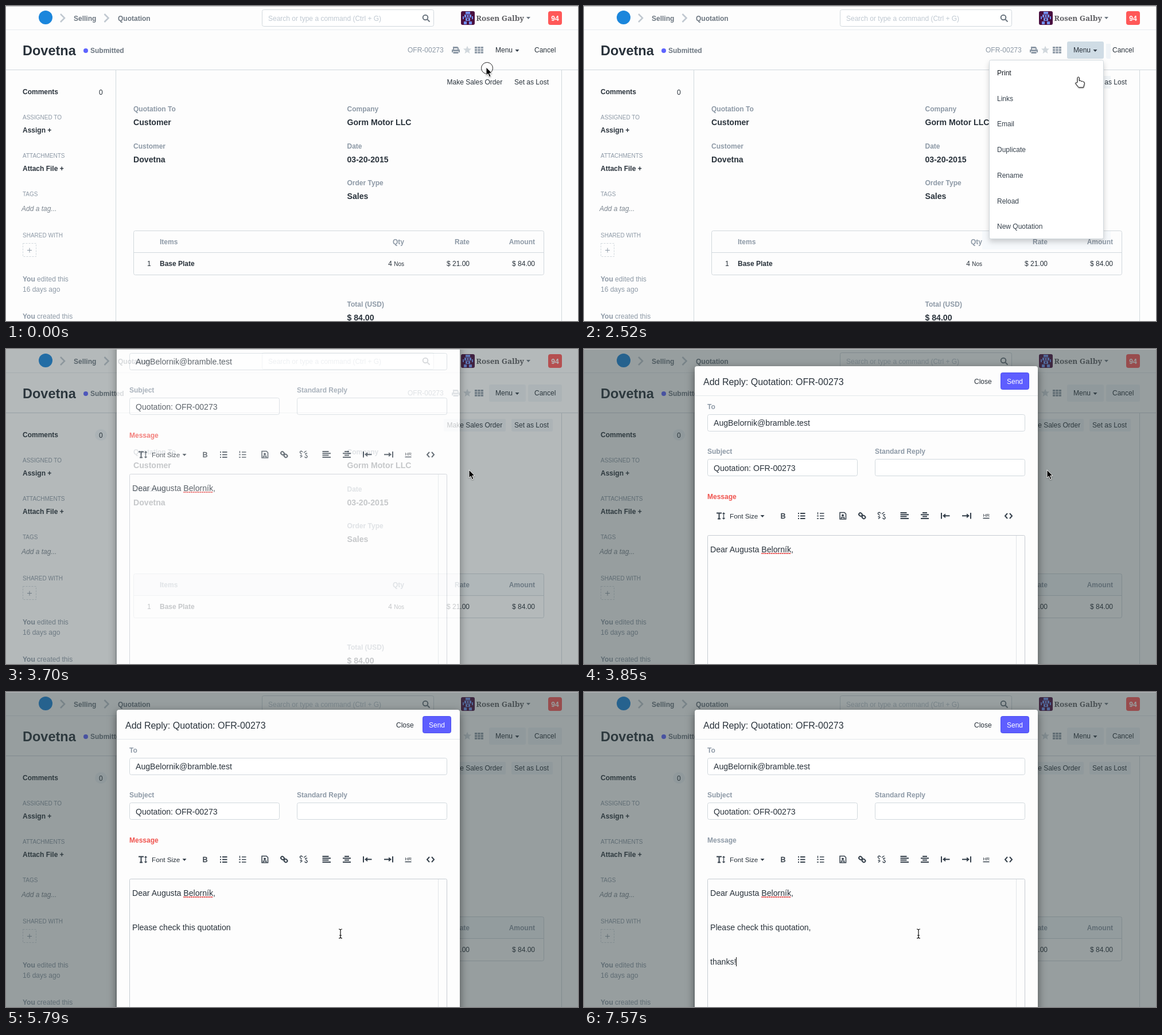
Animation, 997 px wide and 550 px high, one loop 8 s. Source, as an HTML page:

```html
<!DOCTYPE html>
<html lang="en">
<head>
<meta charset="utf-8">
<title>Quotation reply</title>
<style>
  html, body { margin: 0; width: 100%; height: 100%; overflow: hidden; background: #fdfdfd; }
  svg { display: block; width: 100%; height: 100%; }
  text { font: 12px "Liberation Sans", Arial, sans-serif; fill: #29323b; white-space: pre; }
  .b { font-weight: bold; }
  .m { fill: #8d99a6; }
  .nav { fill: #6c7680; font-weight: bold; }
  .xs { font-size: 10px; }
  .l { font-size: 14.1px; }
  .r { text-anchor: end; }
  .box { fill: #fff; stroke: #d1d8dd; }
  .line { fill: none; stroke: #d1d8dd; }
  .tint { fill: #f0f4f7; }
  .ico { fill: none; stroke: #36414c; stroke-width: 2; }
  .thin { stroke-width: 1.5; }
  .solid { fill: #36414c; stroke: none; }
  .menu { filter: drop-shadow(0 5px 5px rgba(0, 0, 0, .18)); }
  .sheet { filter: drop-shadow(0 5px 7.5px rgba(0, 0, 0, .5)); }
  .ptr { filter: drop-shadow(0 1px 1px rgba(0, 0, 0, .35)); }
</style>
</head>
<body>
<svg viewBox="0 0 997 550" preserveAspectRatio="none">
  <defs>
    <clipPath id="tintClip"><rect id="tintBox"/></clipPath>
    <path id="down" d="M0 0h7l-3.5 4z"/>
  </defs>
  <rect width="997" height="550" fill="#fdfdfd"/>

  <!-- button and header backgrounds -->
  <g clip-path="url(#tintClip)" class="tint">
    <rect x="763" y="122" width="108" height="22" rx="2"/>
    <rect x="881" y="122" width="72" height="22" rx="2"/>
    <rect x="910" y="62" width="59" height="30" rx="3"/>
    <rect x="155" y="140" width="21" height="20" rx="10"/>
    <rect x="222" y="393" width="716" height="37" fill="#f6f9fc"/>
  </g>
  <rect id="menuBtn" x="842" y="62" width="64" height="30" rx="3"/>

  <!-- top bar -->
  <path class="line" d="M0 41.5H997" style="stroke:#e8ecef"/>
  <path class="line" d="M0 111.5H997M191.5 112V550M968.5 112V550"/>
  <circle cx="69" cy="20" r="12" fill="#1b86dc"/>
  <path d="M95 14l7 7-7 7M171.5 14l7 7-7 7" fill="none" stroke="#c0c8d0" stroke-width="2.5"/>
  <text x="118" y="26" class="nav">Selling</text>
  <text x="195" y="26" class="nav">Quotation</text>
  <rect class="box" x="446.5" y="6.5" width="299" height="29" rx="3"/>
  <text x="457" y="26" style="fill:#c0c9d2">Search or type a command (Ctrl + G)</text>
  <g fill="none" stroke="#6c7680" stroke-width="2"><circle cx="731" cy="20" r="4.3"/><path d="M734.5 23.5l4 4"/></g>
  <rect x="793" y="9" width="24" height="24" rx="3" fill="#4a1040"/>
  <path fill="#7391f2" d="M801 10h8v4h-8zM799 15h12v5h-12zM801 21h8v5h-8zM796 18h2v5h-2zM812 18h2v5h-2zM798 27h5v5h-5zM807 27h5v5h-5z"/>
  <path fill="#4a1040" d="M802 16h2v3h-2zM806 16h2v3h-2zM804 22h2v3h-2z"/>
  <text x="819.5" y="26" style="font:bold 13.4px 'Noto Serif',serif;fill:#5c5c60">Rosen Galby</text>
  <use href="#down" x="907" y="19" fill="#6c7680"/>
  <rect x="945" y="9" width="24" height="24" rx="4" fill="#ff5858"/>
  <text x="957" y="25.5" class="b" text-anchor="middle" style="fill:#fff">94</text>

  <!-- page head -->
  <text x="29" y="86" class="b" style="font-size:23.5px">Dovetna</text>
  <circle cx="139" cy="78" r="4" fill="#5e64ff"/>
  <text x="147" y="82" class="nav">Submitted</text>
  <text x="700" y="81" class="m">OFR-00273</text>
  <g fill="#8d99a6">
    <path d="M779 71h8l2 2v3h-2v-2h-6v2h-2zM777 76h14v5h-2v-2h-10v2h-2zM779.5 80h9v3h-9z"/>
    <path d="M804 69.5l2 4.7 5 .4-3.8 3.3 1.2 5-4.4-2.7-4.4 2.7 1.2-5-3.8-3.3 5-.4z" fill="#d1d8dd"/>
    <path d="M817 71h4.3v3.3H817zM822.3 71h4.3v3.3h-4.3zM827.6 71h4.3v3.3h-4.3zM817 75.2h4.3v3.3H817zM822.3 75.2h4.3v3.3h-4.3zM827.6 75.2h4.3v3.3h-4.3zM817 79.4h4.3v3.3H817zM822.3 79.4h4.3v3.3h-4.3zM827.6 79.4h4.3v3.3h-4.3z"/>
  </g>
  <text x="853" y="81">Menu</text>
  <use href="#down" x="887.5" y="76" fill="#36414c"/>
  <text x="921" y="81">Cancel</text>
  <text x="768.5" y="137">Make Sales Order</text>
  <text x="886" y="137">Set as Lost</text>

  <!-- sidebar -->
  <text x="29" y="154" class="b">Comments</text><text x="162" y="155">0</text>
  <text x="29" y="198" class="m xs">ASSIGNED TO</text><text x="29" y="221" class="b">Assign +</text>
  <text x="29" y="265" class="m xs">ATTACHMENTS</text><text x="29" y="288" class="b">Attach File +</text>
  <text x="29" y="332" class="m xs">TAGS</text>
  <text x="27" y="358" style="font-style:italic;fill:#7b858f">Add a tag...</text>
  <text x="29" y="404" class="m xs">SHARED WITH</text>
  <rect x="29.5" y="414.5" width="23" height="23" class="line" stroke-dasharray="3 2"/>
  <path d="M37 426.5h8M41 422.5v8" stroke="#8d99a6"/>
  <text x="29" y="481" class="m"><tspan class="b">You</tspan> edited this</text>
  <text x="29" y="499" class="m">16 days ago</text>
  <text x="29" y="546" class="m"><tspan class="b">You</tspan> created this</text>

  <!-- form -->
  <text x="222" y="184" class="b m">Quotation To</text><text x="222" y="208" class="b l">Customer</text>
  <text x="222" y="249" class="b m">Customer</text><text x="222" y="273" class="b l">Dovetna</text>
  <text x="594.5" y="184" class="b m">Company</text><text x="594.5" y="208" class="b l">Gorm Motor LLC</text>
  <text x="594.5" y="249" class="b m">Date</text><text x="594.5" y="273" class="b l">03-20-2015</text>
  <text x="594.5" y="313" class="b m">Order Type</text><text x="594.5" y="337" class="b l">Sales</text>
  <rect x="222.5" y="392.5" width="715" height="77" rx="3" class="line"/>
  <path class="line" d="M222 430.5H938"/>
  <text x="268" y="416" class="b m">Items</text>
  <text x="694" y="416" class="b m r">Qty</text>
  <text x="808" y="416" class="b m r">Rate</text>
  <text x="922" y="416" class="b m r">Amount</text>
  <text x="246" y="454">1</text><text x="268" y="454" class="b">Base Plate</text>
  <text x="694" y="454" class="r">4 <tspan class="xs">Nos</tspan></text>
  <text x="808" y="454" class="r">$ 21.00</text><text x="922" y="454" class="r">$ 84.00</text>
  <text x="594.5" y="525" class="b m">Total (USD)</text><text x="594.5" y="549" class="b l">$ 84.00</text>

  <!-- dropdown -->
  <g id="menu">
    <rect class="box menu" x="706.5" y="94.5" width="199" height="312" rx="3"/>
  </g>

  <path id="shade" fill="#334143" fill-rule="evenodd"/>

  <!-- dialog -->
  <g id="dialog">
    <rect class="sheet" x="193" y="31" width="598" height="680" rx="4" fill="#fdfdfd"/>
    <path class="line" d="M193 82.5H791" style="stroke:#e4e8eb"/>
    <text x="208" y="64" style="font-size:16px">Add Reply: Quotation: OFR-00273</text>
    <text x="680" y="62">Close</text>
    <rect x="726.5" y="42.5" width="49" height="29" rx="3" fill="#5e5eff" stroke="#4a4ff0"/>
    <text x="751" y="62" text-anchor="middle" style="fill:#fff">Send</text>
    <text x="215" y="106" class="b m">To</text>
    <rect class="box" x="215.5" y="115.5" width="553" height="29" rx="3"/>
    <text x="226" y="135" class="l">AugBelornik@bramble.test</text>
    <text x="215" y="184" class="b m">Subject</text>
    <rect class="box" x="215.5" y="193.5" width="261" height="29" rx="3"/>
    <text x="226" y="214" class="l">Quotation: OFR-00273</text>
    <text x="507" y="184" class="b m">Standard Reply</text>
    <rect class="box" x="507.5" y="193.5" width="261" height="29" rx="3"/>
    <text id="label" x="215" y="263" class="b">Message</text>

    <path class="ico" d="M231 287.5h9M235.5 287v10M233 297.5h5"/>
    <path class="ico" d="M243.5 288v9M241.5 289l2-2 2 2M241.5 296l2 2 2-2" style="stroke-width:1.2"/>
    <text x="254" y="297" style="font-size:11.7px">Font Size</text>
    <use href="#down" x="307.5" y="291" fill="#36414c"/>
    <text x="342.5" y="297" style="font-size:13.5px;stroke:#36414c;stroke-width:.4px">B</text>
    <path class="ico" d="M377 288h8.5M377 292.5h8.5M377 297h8.5M373 288h2M373 292.5h2M373 297h2"/>
    <path class="ico thin" d="M411 288h7.5M411 292.5h7.5M411 297h7.5"/>
    <path class="ico" d="M407.5 286v4M406 292.5h3M406 297h3" style="stroke-width:1.3"/>
    <path class="ico thin" d="M446 286.5h8l2.5 2.5v9h-10.5zM448.5 298v-3h5v3"/>
    <circle class="solid" cx="451" cy="291.5" r="2"/>
    <g class="ico">
      <rect x="479" y="287.5" width="6" height="5" rx="2.5" transform="rotate(40 482 290)"/>
      <rect x="484.5" y="292" width="6" height="5" rx="2.5" transform="rotate(40 487.5 294.5)"/>
    </g>
    <path class="ico thin" d="M517 288l-1.5-1.5q-2-1-3 1-.5 1.5 1 2.5l2 1.500M520.5 296l1.5 1.5q2 1 3-1 .5-1.500-1-2.500l-2-1.500M519 289l4.500-3M521 291l4-1M513 297.500l3.500-3M512.500 294l3-.5"/>
    <path class="ico" d="M551.5 287h11M551.5 290.3h14.5M551.5 293.6h11M551.5 297h14.5M590 287h8M587 290.3h14M590 293.6h8M587 297h14"/>
    <path class="ico" d="M623 287v10.5M627 292.3h10.5M674 287v10.5M659 292.3h10.5"/>
    <path class="solid" d="M625 292.3l5-4v8zM672 292.3l-5-4v8z"/>
    <text x="695.5" y="293.5" style="font-size:8px">HR</text>
    <path class="ico thin" d="M695.5 296.5h11"/>
    <path class="ico" d="M738 288l-4 4.5 4 4.5M742 288l4 4.5-4 4.5"/>

    <path class="line" d="M753.5 327V700" style="stroke:#e0e4e8"/>
    <rect class="line" x="215.5" y="326.5" width="553" height="374" rx="2" style="stroke:#c6ccd2"/>
    <text x="220" y="356" class="l">Dear Augusta Belorník,</text>
    <path d="M309.5 358H361" stroke="#e02b2b" stroke-width="2" stroke-dasharray="2 1.2"/>
    <text id="line1" x="220" y="416" class="l"></text>
    <text id="line2" x="220" y="476" class="l"></text>
    <rect id="caret" width="1" height="16" fill="#111"/>
  </g>

  <g id="cursor">
    <circle id="ring" cx="1.5" cy="1.5" r="10" fill="#fff" fill-opacity=".45" stroke="#222"/>
    <path id="arrow" class="ptr" d="M0 0V14L3.2 11.2 5.5 16.8 8 15.8 5.7 10.3H10Z" fill="#000" stroke="#fff"/>
    <path id="hand" class="ptr" d="M-2 9V1.5a1.6 1.6 0 0 1 3.2 0V6.5q3-.8 3.6.8 2.6-.6 3 .9 2.3-.4 2.3 1.6V12l-1.6 6H.2L-5.6 10.8q.6-2.2 2.6-.6z" fill="#fff" stroke="#000"/>
    <path id="beam" d="M-3-8q3 0 3 2 0-2 3-2M0-6V6M-3 8q3 0 3-2 0 2 3 2M-2 3H2" fill="none" stroke="#111" stroke-width="1.2"/>
  </g>
  <rect width="997" height="1" fill="#b9bbbd"/>
</svg>
<script>
const LOOP = 8000, ROW = 44.7;
const SHEET = 'M0 1H997V550H0Z', HOLE = 'M193 1H791V550H193z';
const LINE1 = 'Please check this quotation', LINE2 = 'thanks!';
const PATH = [[837, 107], [892, 77], [807, 211], [603, 374], [583, 422]];
const $ = id => document.getElementById(id);
const set = (id, attrs) => { for (const k in attrs) $(id).setAttribute(k, attrs[k]); };
const show = (id, on) => $(id).style.display = on ? '' : 'none';
const within = (t, a, b) => t >= a && t < b;

// Number of ticks passed out of n, spread evenly from a to b
const ticks = (t, a, b, n) =>
  t < a ? 0 : Math.min(n, 1 + Math.floor((t - a) / (b - a) * (n - 1) + 0.01));
const ease = p => p * p * (3 - 2 * p);

const rows = ['Print', 'Links', 'Email', 'Duplicate', 'Rename', 'Reload', 'New Quotation'].map((name, i) => {
  const row = document.createElementNS('http://www.w3.org/2000/svg', 'text');
  row.setAttribute('x', 720);
  row.setAttribute('y', 94 + ROW * i + 27);
  row.textContent = name;
  return $('menu').appendChild(row);
});

function pointer(t) {
  const legs = [
    ticks(t, 600, 1330, 6) / 6, ticks(t, 2370, 2960, 5) / 5,
    ticks(t, 4000, 4300, 3) / 3, ticks(t, 4450, 4750, 3) / 3
  ];
  let [x, y] = PATH[0];
  legs.forEach((p, i) => {
    x += (PATH[i + 1][0] - PATH[i][0]) * ease(p);
    y += (PATH[i + 1][1] - PATH[i][1]) * ease(p);
  });
  return { x, y, overMenu: legs[0] >= 0.5 };
}

function drawPointer(t, p) {
  const kind = t >= 4300 ? 'beam' : p.overMenu && t < 3560 ? 'hand' : 'arrow';
  for (const k of ['arrow', 'hand', 'beam']) show(k, k === kind);
  show('ring', t < 150 || within(t, 1920, 2070) || within(t, 3260, 3410));
  set('cursor', { transform: `translate(${p.x} ${p.y})` });
}

function drawPage(t, p) {
  const [x, y, width, height] =
    t < 600 ? [0, 0, 0, 0] :
    t < 2070 ? [835, 122, 30, 7] :
    t < 3700 ? [694, 66, 224, 359] : [0, 0, 997, 550];
  set('tintBox', { x, y, width, height });
  set('menuBtn', { fill: !p.overMenu ? 'none' : t < 3410 ? '#cfdce5' : '#f0f4f7' });
  show('menu', within(t, 2070, 3410));
  rows.forEach((row, i) => {
    row.style.fill = i === Math.floor((p.y - 94) / ROW) ? '#151b22' : '#36414c';
  });
}

function drawDialog(t) {
  const fading = t < 3850;
  show('shade', t >= 3700);
  show('dialog', t >= 3700);
  set('shade', { d: fading ? SHEET + HOLE : SHEET, opacity: fading ? 0.36 : 0.5 });
  set('dialog', {
    opacity: fading ? 0.74 : 1,
    transform: `translate(0 ${fading ? -108 : t < 4000 ? -1 : 0})`
  });
  $('label').style.fill = t < 6390 ? '#f0544f' : '#8d99a6';

  const typed = Math.max(0, ticks(t, 4450, 5340, 7) - 2);
  $('line1').textContent = LINE1.slice(0, Math.round(LINE1.length * typed / 5)) + (t >= 6390 ? ',' : '');
  const k = ticks(t, 6390, 7280, 7);
  const count = t >= 7570 ? 7 : k === 7 ? 6 : Math.max(0, k - 2);
  $('line2').textContent = LINE2.slice(0, count);

  const line = k > 1 ? 'line2' : 'line1';
  set('caret', {
    x: Math.round(220 + $(line).getComputedTextLength()),
    y: k > 2 ? 463 : k > 1 ? 433 : 403
  });
  show('caret', within(t, 4747, 5790) || within(t, 6390, 7280) || t >= 7570);
}

const start = performance.now();
function draw() {
  const t = (performance.now() - start) % LOOP;
  const p = pointer(t);
  drawPage(t, p);
  drawDialog(t);
  drawPointer(t, p);
  requestAnimationFrame(draw);
}
draw();
</script>
</body>
</html>
```
